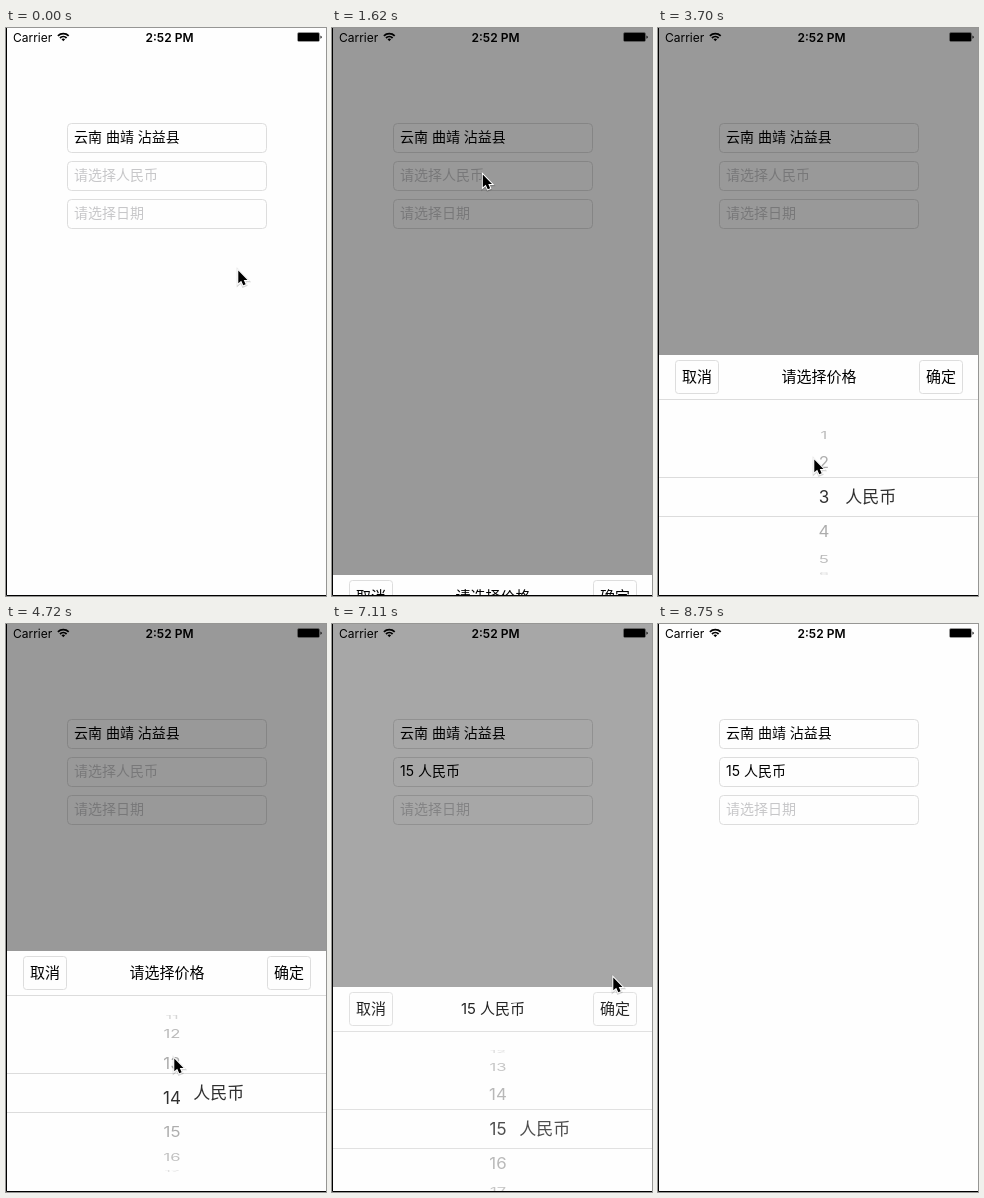
Animation, 320 px wide and 568 px high, one loop 9.07 s. Source, as an HTML page:

```html
<!DOCTYPE html>
<html lang="zh-CN">
<head>
<meta charset="utf-8">
<title>Picker</title>
<style>
  html, body { margin: 0; width: 100%; height: 100%; overflow: hidden; background: #fefefe; }
  svg { display: block; width: 320px; height: 568px; }
  text { font: 15px Inter, "Noto Sans CJK SC", "Noto Sans CJK", sans-serif; fill: #000; white-space: pre; }
  .status { font-size: 12px; }
  .bold { font-weight: 600; }
  .field text { font-size: 14px; }
  .field .hint { fill: #c7c7c9; }
  .wheel text, .unit { font-size: 17px; fill: #303030; }
  .wheel text, .mid { text-anchor: middle; }
  .box { fill: #fefefe; stroke: #ddd; }
  .rule { stroke: #dcdcdc; }
  .paper { fill: #fefefe; }
</style>
</head>
<body>
<svg viewBox="0 0 320 568">
  <defs>
    <clipPath id="band"><rect x="120" y="450" width="90" height="38"/></clipPath>
    <path id="arrow" d="M0 0V14L3.2 11.2L5.4 16.2L8 15.1L5.9 10.3H10Z"/>
  </defs>
  <rect class="paper" width="320" height="568"/>

  <text class="status" x="7" y="13.5">Carrier</text>
  <g fill="none" stroke="#000" stroke-width="1.8">
    <path d="M51.9 7.9A7.7 7.7 0 0 1 62.7 7.9M54 10A4.7 4.7 0 0 1 60.6 10"/>
    <path d="M57.3 13.2L55.5 11.3A2.6 2.6 0 0 1 59.1 11.3Z" fill="#000" stroke="none"/>
  </g>
  <text class="status bold mid" x="163.5" y="13.5">2:52 PM</text>
  <rect x="291.5" y="4.5" width="22" height="9" rx="1.5" fill="none" stroke="#000" opacity=".4"/>
  <rect x="292" y="5" width="21" height="8" rx=".6"/>
  <path d="M314.5 7.4Q317 9.1 314.5 10.8Z"/>

  <g class="field">
    <rect class="box" x="61.5" y="95.5" width="199" height="29" rx="4"/>
    <text x="68" y="114">云南 曲靖 沾益县</text>
    <rect class="box" x="61.5" y="133.5" width="199" height="29" rx="4"/>
    <text id="price" x="68" y="152"></text>
    <rect class="box" x="61.5" y="171.5" width="199" height="29" rx="4"/>
    <text class="hint" x="68" y="190">请选择日期</text>
  </g>

  <g id="dialog">
    <rect width="320" height="568" opacity=".4"/>
    <g id="sheet">
      <rect class="paper" y="327" width="320" height="241"/>
      <rect class="box" x="17.5" y="332.5" width="43" height="33" rx="3"/>
      <text class="mid" x="39" y="354">取消</text>
      <text class="mid" id="title" x="161" y="354"></text>
      <rect class="box" x="261.5" y="332.5" width="43" height="33" rx="3"/>
      <text class="mid" x="283" y="354">确定</text>
      <path class="rule" d="M0 371.5H320"/>
      <g class="wheel" id="outer"></g>
      <g clip-path="url(#band)">
        <rect class="paper" x="120" y="450" width="90" height="38"/>
        <g class="wheel" id="inner"></g>
      </g>
      <path class="rule" d="M0 449.5H320M0 488.5H320"/>
      <text class="unit" x="187.3" y="475">人民币</text>
    </g>
  </g>

  <path d="M.5 0V567.5H320" fill="none" stroke="#000"/>
  <g id="cursor">
    <g transform="translate(.3 -.6) scale(.92)">
      <use href="#arrow" y=".8" fill="none" stroke="#000" stroke-width="3.4" opacity=".16"/>
      <use href="#arrow" stroke="#fff" stroke-width="2.2" paint-order="stroke"/>
    </g>
  </g>
</svg>

<script>
const LOOP = 9070, TICK = 148, LEAD = 16;
const RADIUS = 78.6, ROW_ANGLE = 26 * Math.PI / 180;
const WHEEL_X = 166, WHEEL_Y = 469, SHEET_HEIGHT = 241;
// Moments on the tick clock
const OPEN = 10, PRESS = 23, RELEASE = 25, SETTLED = 40, CONFIRM = 48, CLOSED = 50;
const PICKED = 15, DRAGGED_ROWS = 2, FRICTION = 0.3375;

const $ = id => document.getElementById(id);
const mix = (a, b, k) => a + (b - a) * k;
const ease = (tick, from, to) => {
  const k = Math.min(1, Math.max(0, (tick - from) / (to - from)));
  return k * k * (3 - 2 * k);
};

const home = { x: 232, y: 243 };
const moves = [
  { from: 0, to: 5, x: 168, y: 116 },
  { from: 5, to: 8, x: 150.5, y: 147 },
  { from: 16.8, to: PRESS, x: 178, y: 500 },
  { from: PRESS, to: RELEASE, x: 156, y: 432 },
  { from: RELEASE, to: 27, x: 168, y: 435 },
  { from: 41, to: 46, x: 281, y: 354 },
  { from: 52, to: 59, x: 291, y: 600 }
];

function cursorAt(tick) {
  return moves.reduce((point, move) => {
    const k = ease(tick, move.from, move.to);
    return { x: mix(point.x, move.x, k), y: mix(point.y, move.y, k) };
  }, home);
}

// The wheel follows the drag, then coasts to the picked value
function wheelAt(tick) {
  if (tick >= SETTLED) return PICKED;
  const dragged = 1 + DRAGGED_ROWS * ease(tick, PRESS, RELEASE);
  const coast = 1 - Math.exp(-FRICTION * Math.max(0, tick - RELEASE));
  return mix(dragged, PICKED, coast);
}

function makeRows(parent) {
  return Array.from({ length: 9 }, () =>
    parent.appendChild(document.createElementNS("http://www.w3.org/2000/svg", "text")));
}
const outerRows = makeRows($("outer")), innerRows = makeRows($("inner"));

function placeRow(row, value, position, fade) {
  const angle = (value - position) * ROW_ANGLE, depth = Math.cos(angle);
  const visible = value > 0 && Math.abs(angle) < Math.PI / 2;
  row.style.display = visible ? "" : "none";
  if (!visible) return;
  row.textContent = value;
  row.setAttribute("y", 6.2);
  row.setAttribute("opacity", fade ? 0.42 * depth ** 0.6 : 1);
  row.setAttribute("transform",
    `translate(${WHEEL_X} ${WHEEL_Y + RADIUS * Math.sin(angle)}) scale(${mix(0.94, 1, depth)} ${depth})`);
}

function draw(tick) {
  const { x, y } = cursorAt(tick), position = wheelAt(tick);
  const first = Math.round(position) - 4, chosen = tick >= CONFIRM;
  const entered = ease(tick, OPEN + 0.55, OPEN + 3);
  const left = ease(tick, CONFIRM - 0.5, CONFIRM + 1.55);
  $("cursor").setAttribute("transform", `translate(${x} ${y})`);
  $("dialog").style.display = tick >= OPEN && tick < CLOSED ? "" : "none";
  $("dialog").setAttribute("opacity", 1 - left);
  $("sheet").setAttribute("transform", `translate(0 ${Math.round((1 - entered + left) * SHEET_HEIGHT)})`);
  $("title").textContent = tick >= SETTLED ? `${PICKED} 人民币` : "请选择价格";
  $("price").textContent = chosen ? `${PICKED} 人民币` : "请选择人民币";
  $("price").setAttribute("class", chosen ? "" : "hint");
  outerRows.forEach((row, i) => placeRow(row, first + i, position, true));
  innerRows.forEach((row, i) => placeRow(row, first + i, position, false));
}

const start = performance.now();
let shown = -1;
function frame() {
  const time = (performance.now() - start) % LOOP;
  const tick = Math.min(59, Math.floor((time + LEAD) / TICK));
  if (tick !== shown) draw(shown = tick);
  requestAnimationFrame(frame);
}
frame();
</script>
</body>
</html>
```
